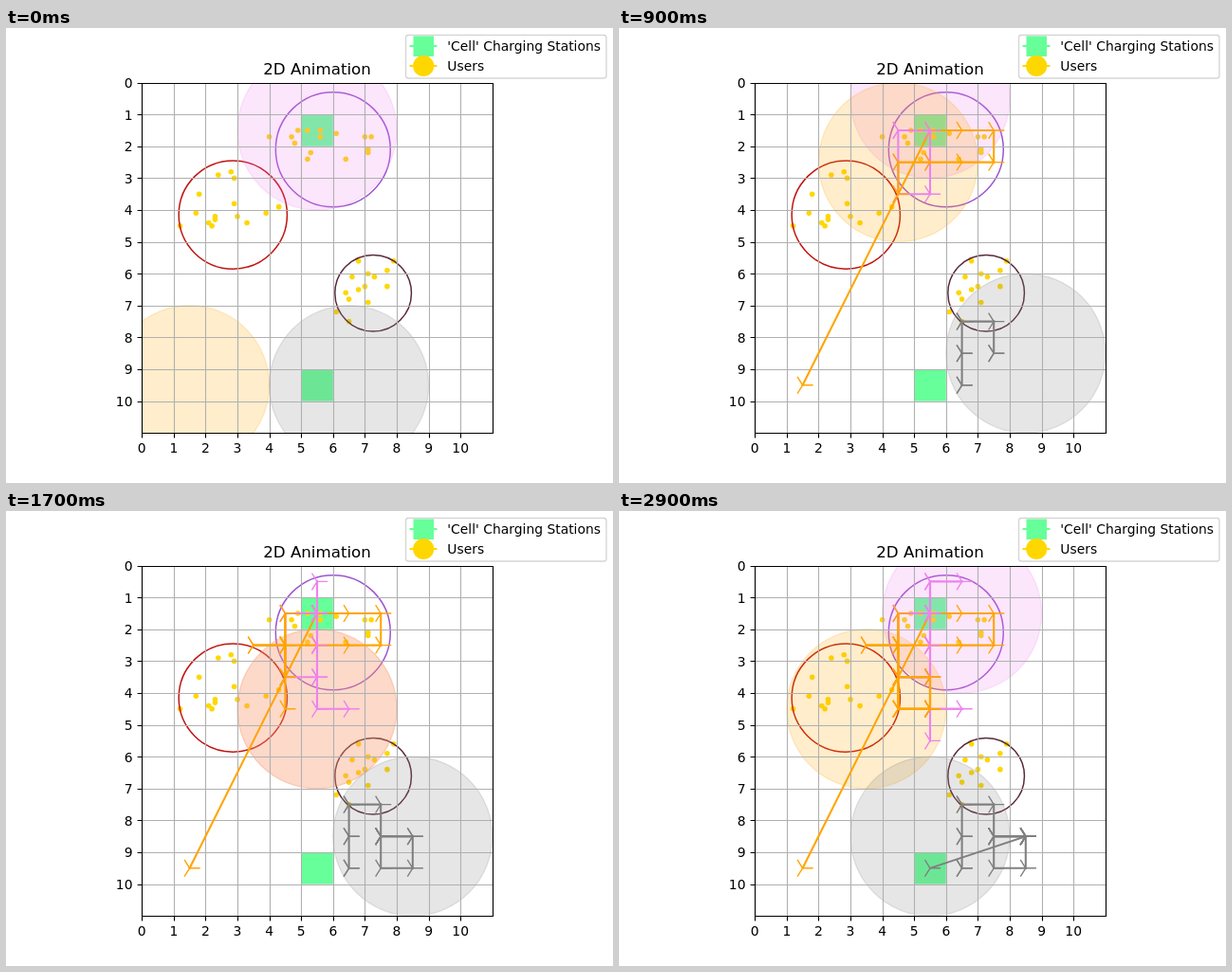
Write an HTML page that moves like this. It is 640 px wide and 480 px high and loops after 3000 ms.

```html
<!DOCTYPE html>
<html lang="en">
<head>
<meta charset="utf-8">
<title>2D Animation</title>
<style>
  html, body { margin: 0; width: 100%; height: 100%; overflow: hidden; background: #fff; }
  svg { display: block; width: 640px; height: 480px; }
  text { font-family: "DejaVu Sans", sans-serif; font-size: 13.89px; fill: #000; }
</style>
</head>
<body>
<svg id="stage" viewBox="0 0 640 480" xmlns="http://www.w3.org/2000/svg"></svg>
<script>
const LEFT = 143.2, TOP = 57.6, UNIT = 33.6, CELLS = 11;
const STEP = 100, STEPS = 30;
const THIN = 1.11, EDGE = 1.39, LINE = 2.08;
const GREEN = '#66ff99', GOLD = '#ffd700';

const stage = document.getElementById('stage');
const px = x => LEFT + x * UNIT;
const py = y => TOP + y * UNIT;
const snap = v => Math.floor(v + 0.5) + 0.5;

function add(parent, tag, attrs, text) {
  const el = document.createElementNS('http://www.w3.org/2000/svg', tag);
  for (const name in attrs) el.setAttribute(name, attrs[name]);
  if (text !== undefined) el.textContent = text;
  parent.appendChild(el);
  return el;
}
const path = (parent, d, stroke, width, more) =>
  add(parent, 'path', { d, stroke, 'stroke-width': width, fill: 'none', ...more });

const x0 = snap(px(0)), x1 = snap(px(CELLS));
const y0 = snap(py(0)), y1 = snap(py(CELLS));

const clip = add(add(stage, 'defs', {}), 'clipPath', { id: 'plot' });
add(clip, 'rect', { x: x0, y: y0, width: x1 - x0, height: y1 - y0 });
const plot = add(stage, 'g', { 'clip-path': 'url(#plot)' });

// Charging stations
const stations = { A: [5.5, 1.5], B: [5.5, 9.5] };
for (const [x, y] of Object.values(stations)) {
  add(plot, 'rect', { x: px(x - 0.5), y: py(y - 0.5), width: UNIT, height: UNIT, fill: GREEN });
}

// User clusters: ring centre, radius, and members in tenths of a cell
const clusters = [
  { x: 6, y: 2.1, r: 1.8, color: '#9d55d0',
    users: [[40,17],[47,17],[49,15],[52,15],[56,15],[61,16],[48,19],[56,17],
            [70,17],[72,17],[53,22],[52,24],[64,24],[71,21],[71,22]] },
  { x: 2.86, y: 4.15, r: 1.7, color: '#c01410',
    users: [[28,28],[24,29],[29,30],[18,35],[29,38],[17,41],[23,42],[23,43],
            [30,42],[39,41],[43,39],[33,44],[21,44],[22,45],[12,45]] },
  { x: 7.26, y: 6.61, r: 1.2, color: '#5a2a3a',
    users: [[68,56],[79,56],[77,59],[71,60],[66,61],[73,61],[70,64],[68,65],
            [77,64],[64,66],[65,68],[71,69],[61,72],[65,75]] }
];
for (const c of clusters) {
  for (const [x, y] of c.users) {
    add(plot, 'circle', { cx: px(x / 10), cy: py(y / 10), r: 2.8, fill: GOLD });
  }
}
for (const c of clusters) {
  add(plot, 'circle', { cx: px(c.x), cy: py(c.y), r: c.r * UNIT,
    fill: 'none', stroke: c.color, 'stroke-width': 1.5 });
}

// Moves: U D L R by one cell, "." waits, A and B go to a station
const moves = { U: [0, -1], D: [0, 1], L: [-1, 0], R: [1, 0], '.': [0, 0] };
function route(start, plan) {
  const points = [start];
  for (const m of plan) {
    const [x, y] = points[points.length - 1];
    points.push(stations[m] || [x + moves[m][0], y + moves[m][1]]);
  }
  return points;
}
const agents = [
  { color: '#ee82ee', points: route([5.5, 1.5], '.DDLUU.RUD.D.DDRLDUU.LRUU.URD') },
  { color: '#ffa500', points: route([1.5, 9.5], 'ARRDLLLDUL.RUDDDRUDLRULDRULDL') },
  { color: '#808080', points: route([6.5, 9.5], '.U.U.RD.RL.DRUL.R' + '.'.repeat(10) + 'BU') }
];
for (const a of agents) {
  a.range = add(plot, 'circle', { r: 2.5 * UNIT, fill: a.color, stroke: a.color,
    'stroke-width': EDGE, 'fill-opacity': 0.2, 'stroke-opacity': 0.2 });
}

// Grid
for (let i = 0; i < CELLS; i++) {
  path(plot, `M${snap(px(i))} ${y0}V${y1}M${x0} ${snap(py(i))}H${x1}`, '#b0b0b0', THIN);
}

// Trails, one group per step
const trail = [];
for (let s = 0; s < STEPS - 1; s++) {
  const g = add(plot, 'g', {});
  for (const { color, points } of agents) {
    const [x, y] = points[s];
    if (s) {
      const [u, v] = points[s - 1];
      if (u !== x || v !== y) {
        path(g, `M${px(u)} ${py(v)}L${px(x)} ${py(y)}`, color, LINE, { 'stroke-linecap': 'square' });
      }
    }
    path(g, `M${px(x)} ${py(y)}h11.1m-11.1 0l-5.55 -8.9m5.55 8.9l-5.55 8.9`, color, EDGE);
  }
  trail.push(g);
}

// Axes
path(stage, `M${x0} ${y0}H${x1}V${y1}H${x0}Z`, '#000', THIN);
for (let i = 0; i < CELLS; i++) {
  const x = snap(px(i)), y = snap(py(i));
  path(stage, `M${x} ${y1}v4.9M${x0} ${y}h-4.9`, '#000', THIN);
  add(stage, 'text', { x: px(i), y: 448, 'text-anchor': 'middle' }, i);
  add(stage, 'text', { x: 133.5, y: py(i) + 5.3, 'text-anchor': 'end' }, i);
}
add(stage, 'text', { x: 328, y: 49.3, 'text-anchor': 'middle', style: 'font-size:16.67px' }, '2D Animation');

// Legend
add(stage, 'rect', { x: 421.5, y: 7.5, width: 211.5, height: 45.5, rx: 2.8,
  fill: '#fff', 'fill-opacity': 0.8, stroke: '#ccc', 'stroke-opacity': 0.8, 'stroke-width': EDGE });
path(stage, 'M425.5 19H454.5', GREEN, LINE);
add(stage, 'rect', { x: 429.5, y: 8.5, width: 21.5, height: 21.5, fill: GREEN });
path(stage, 'M425.5 40H454.5', GOLD, LINE);
add(stage, 'circle', { cx: 440.2, cy: 40, r: 11.1, fill: GOLD });
add(stage, 'text', { x: 465.3, y: 23.5 }, "'Cell' Charging Stations");
add(stage, 'text', { x: 465.3, y: 44.5 }, 'Users');

let shown = -1;
function render(ms) {
  const k = Math.floor(ms / STEP) % STEPS;
  if (k === shown) return;
  shown = k;
  for (const a of agents) {
    const [x, y] = a.points[k];
    a.range.setAttribute('cx', px(x));
    a.range.setAttribute('cy', py(y));
  }
  trail.forEach((g, s) => g.setAttribute('display', s < k ? 'inline' : 'none'));
}

const start = performance.now();
function tick() {
  render(Math.max(0, performance.now() - start));
  requestAnimationFrame(tick);
}
render(0);
requestAnimationFrame(tick);
</script>
</body>
</html>
```
